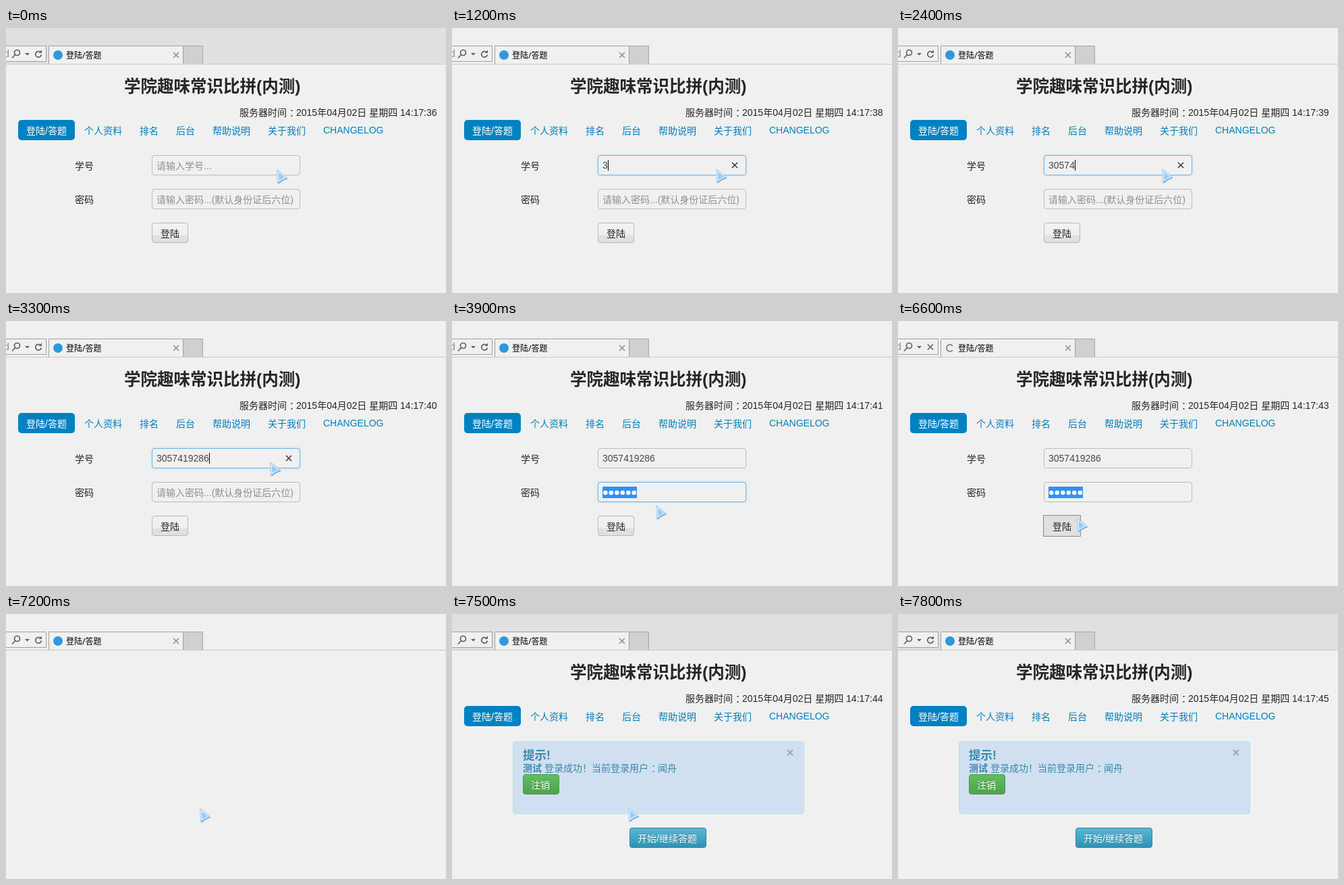
An HTML page that plays this animation: 652 px wide and 392 px high, repeating every 8 s.

```html
<!DOCTYPE html>
<html lang="zh-CN">
<head>
<meta charset="utf-8">
<title>登陆/答题</title>
<style>
  html, body { margin: 0; width: 100%; height: 100%; overflow: hidden; background: #f0f0f0; }
  svg { display: block; }
  text { font: 14px "Liberation Sans", "Noto Sans CJK SC", sans-serif; fill: #262626; }
  .link text { fill: #007fbc; }
  text.hint { fill: #909090; }
  text.typed { fill: #484848; }
  .field { fill: #f0f0f0; stroke: #bcbcbc; }
  .field.focus { stroke: #6ab2e4; filter: drop-shadow(0 0 2px rgba(82, 168, 236, .25)); }
  .notice text { fill: #3a87ad; }
  .notice text.light { fill: #fff; text-shadow: 0 -1px 0 rgba(0, 0, 0, .25); }
  .line { fill: none; stroke: #606060; stroke-width: 1.7; }
  .hidden { display: none; }
</style>
</head>
<body>
<svg width="652" height="392" viewBox="0 0 652 392">
  <defs>
    <linearGradient id="grey" x2="0" y2="1"><stop stop-color="#f2f2f2"/><stop offset=".6" stop-color="#efefef"/><stop offset=".64" stop-color="#e1e1e1"/><stop offset="1" stop-color="#dfdfdf"/></linearGradient>
    <linearGradient id="green" x2="0" y2="1"><stop stop-color="#5fbf5f"/><stop offset="1" stop-color="#50a150"/></linearGradient>
    <linearGradient id="blue" x2="0" y2="1"><stop stop-color="#58b8d8"/><stop offset="1" stop-color="#2f92b2"/></linearGradient>
    <path id="cross" d="M-4-4L4 4M4-4L-4 4"/>
  </defs>

  <!-- browser chrome -->
  <rect id="bar" width="652" height="53" fill="#e0e0e0"/>
  <path d="M-1 26.5H59.5V49.5H-1" fill="#f0f0f0" stroke="#a0a0a0"/>
  <path d="M262.5 53V26.5H291.5V53" fill="#d0d0d0" stroke="#a8a8a8"/>
  <path d="M63.5 53V26.5H262.5V53" fill="#f0f0f0" stroke="#a0a0a0"/>
  <path d="M0 53.5H652" stroke="#cacaca"/>
  <text id="address" x="-3" y="43" style="fill:#888">d</text>
  <g class="line">
    <circle cx="16.5" cy="36.5" r="4"/>
    <path d="M13.5 39.5L9 44.5"/>
    <path d="M28 37H35L31.5 40.5Z" fill="#606060" stroke="none"/>
    <g id="reload">
      <path d="M50.5 35.3A4.3 4.3 0 1 0 52.3 39.5"/>
      <path d="M48.5 37H53V32.5Z" fill="#606060" stroke="none"/>
    </g>
    <use id="stop" href="#cross" x="48" y="38.5"/>
    <use href="#cross" x="252" y="40" stroke="#959595"/>
    <circle id="spinner" cx="77" cy="40" r="5" stroke="#858585" stroke-width="2" stroke-dasharray="24 8"/>
  </g>
  <circle id="icon" cx="77" cy="40" r="7" fill="#2f98dc"/>
  <text x="89" y="45" style="font:12px 'Noto Sans','Noto Sans CJK SC',sans-serif;fill:#000">登陆/答题</text>

  <g id="page">
    <text x="175" y="95" style="font-size:24.5px;font-weight:bold">学院趣味常识比拼(内测)</text>
    <text x="346" y="130">服务器时间<tspan dx="4">：</tspan><tspan id="clock" dx="-4"></tspan></text>
    <rect x="18" y="136" width="84" height="30" rx="5" fill="#0082c2"/>
    <text x="30" y="157" style="fill:#fff">登陆/答题</text>
    <g class="link">
      <text x="116" y="157">个人资料</text>
      <text x="198" y="157">排名</text>
      <text x="252" y="157">后台</text>
      <text x="306" y="157">帮助说明</text>
      <text x="388" y="157">关于我们</text>
      <text x="470" y="156">CHANGELOG</text>
    </g>

    <g id="form">
      <text x="102" y="209">学号</text>
      <rect id="idField" class="field" x="216.5" y="188.5" width="219" height="29" rx="3.5"/>
      <text id="idHint" class="hint" x="223" y="209">请输入学号...</text>
      <text id="idText" class="typed" x="223" y="208"></text>
      <path id="caret" d="M.5 195V211" stroke="#000"/>
      <use id="clear" class="line" href="#cross" x="419" y="203" style="stroke:#444"/>

      <text x="102" y="259">密码</text>
      <rect id="passField" class="field" x="216.5" y="238.5" width="219" height="29" rx="3.5"/>
      <text id="passHint" class="hint" x="223" y="259">请输入密码...(默认身份证后六位)</text>
      <g id="passText">
        <rect x="223" y="245" width="51" height="17" fill="#3090f5"/>
        <path d="M227.3 254H274" stroke="#fff" stroke-width="6.6" stroke-linecap="round" stroke-dasharray="0 8.5"/>
      </g>

      <rect id="button" x="216.5" y="288.5" width="53" height="29" rx="3.5" fill="url(#grey)" stroke="#b8b8b8"/>
      <g id="pressed">
        <rect x="216" y="288" width="54" height="30" fill="#e0e0e0"/>
        <rect x="215.5" y="287.5" width="55" height="31" fill="none" stroke="#222" stroke-dasharray="1" stroke-dashoffset=".5"/>
      </g>
      <text x="229" y="309">登陆</text>
    </g>

    <g id="result" class="notice">
      <rect x="90.5" y="188.5" width="431" height="107" rx="3.5" fill="#d0e0f0" stroke="#bce0e8"/>
      <text x="105" y="215" style="font-size:17.5px;font-weight:bold">提示!</text>
      <text x="105" y="233"><tspan font-weight="bold">测试</tspan> 登录成功！当前登录用户<tspan dx="4">：</tspan><tspan dx="-4">闻舟</tspan></text>
      <use class="line" href="#cross" x="501" y="205" style="stroke:#98a8b6;stroke-width:2"/>
      <rect x="105.5" y="237.5" width="53" height="29" rx="3.5" fill="url(#green)" stroke="#4a9a4a"/>
      <text class="light" x="117" y="258">注销</text>
      <rect x="263.5" y="316.5" width="113" height="29" rx="3.5" fill="url(#blue)" stroke="#3088a4"/>
      <text class="light" x="275" y="337">开始/继续答题</text>
    </g>
  </g>

  <g id="cursor" stroke-linejoin="round">
    <path d="M1.2 1.5L15 13L8.5 15.5L2 20.5Z" fill="#98caf4" stroke="#b4d6f4" stroke-width="2.2"/>
    <path d="M2.2 3.8L12.5 12.5L7.5 14.5L3 17.5Z" fill="#98caf4" stroke="#eef7ff"/>
    <path d="M15.8 13.5L9 16.2L2.5 21" fill="none" stroke="#68b0ee" stroke-width="1.6"/>
  </g>
</svg>
<script>
const LOOP = 8000, STEP = 300, ID = "3057419286", DIGIT = 7.786;
const $ = id => document.getElementById(id);

// Each track is a list of [start time, value].
const seconds = [[0, 36], [600, 37], [1200, 38], [2400, 39], [3300, 40], [3900, 41],
  [5400, 42], [6300, 43], [7500, 44], [7800, 45]];
const typed = [[0, 0], [1200, 1], [1800, 2], [2100, 3], [2400, 5], [2700, 7], [3000, 8], [3300, 10]];
const pointer = [[0, [401, 209]], [300, [397, 208]], [600, [388, 232]], [900, [391, 232]],
  [1200, [391, 208]], [3900, [302, 272]], [4800, [266, 291]], [6600, [265, 291]],
  [7200, [287, 287]], [7500, [261, 286]], [7800, null]];

const at = (track, t) => track.findLast(([start]) => start <= t)[1];
const show = (id, on) => $(id).classList.toggle("hidden", !on);
const focus = (id, on) => $(id).classList.toggle("focus", on);

function draw(now) {
  const t = now % LOOP;
  const within = (from, to) => t >= from && t < to;
  const count = at(typed, t), loading = within(5100, 7200), pos = at(pointer, t);

  show("bar", !within(300, 7500));
  show("address", t < 7200);
  show("reload", !loading);
  show("stop", loading);
  show("icon", !loading);
  show("spinner", loading);
  $("spinner").setAttribute("transform", `rotate(${Math.floor(t / STEP) * 100} 77 40)`);

  show("page", !within(7200, 7500));
  show("form", t < 7200);
  show("result", t >= 7500);
  $("clock").textContent = `2015年04月02日 星期四 14:17:${at(seconds, t)}`;

  focus("idField", within(600, 3600));
  show("idHint", t < 300);
  $("idText").textContent = ID.slice(0, count);
  show("caret", within(300, 900) || within(1200, 3600));
  $("caret").setAttribute("transform", `translate(${Math.round(223 + count * DIGIT)})`);
  show("clear", within(1200, 3600));

  focus("passField", within(3600, 5100));
  show("passHint", t < 3600);
  show("passText", t >= 3600);
  show("button", !loading);
  show("pressed", loading);

  show("cursor", pos);
  if (pos) $("cursor").setAttribute("transform", `translate(${pos})`);
  requestAnimationFrame(draw);
}
draw(0);
</script>
</body>
</html>
```
